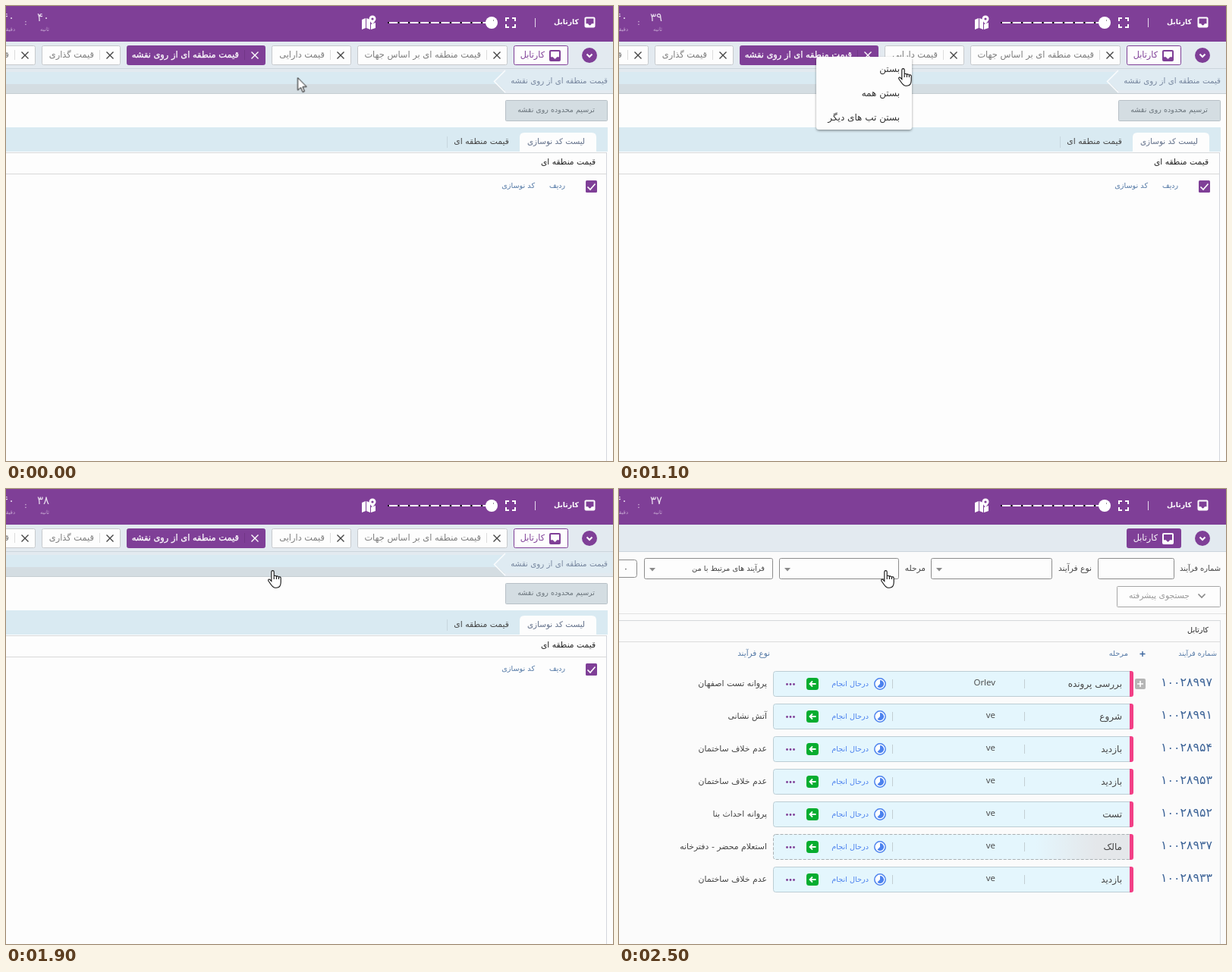
Animation, 800 px wide and 600 px high, one loop 2.7 s. Source, as an HTML page:

```html
<!DOCTYPE html>
<html lang="fa">
<head>
<meta charset="utf-8">
<title>کارتابل</title>
<style>
html, body { margin: 0; width: 100%; height: 100%; overflow: hidden; background: #fdfdfd; }
svg { display: block; width: 800px; height: 600px; }
text { font-family: "DejaVu Sans", sans-serif; direction: rtl; }
.latin { font-family: "Open Sans", sans-serif; direction: ltr; text-anchor: end; }
.mid { text-anchor: middle; }
.crisp { shape-rendering: crispEdges; }

.anim { animation: 2.7s step-end -30ms infinite; }
#old { animation-name: old; }
#inbox { animation-name: inbox; }
#list { animation-name: list; }
#hover { animation-name: hover; }
#menu { animation-name: menu; transform-origin: 323px 115px; }
#arrow { animation-name: arrow; }
#hand { animation-name: hand; }
#s40 { animation-name: s40; }
#s39 { animation-name: s39; }
#s38 { animation-name: s38; }
#s37 { animation-name: s37; }

@keyframes old { 0% { visibility: visible } 77.77%, 100% { visibility: hidden } }
@keyframes inbox { 0% { visibility: hidden } 77.77%, 100% { visibility: visible } }
@keyframes list { 0% { visibility: hidden } 81.48%, 100% { visibility: visible } }
@keyframes hover { 0% { opacity: 0 } 29.62% { opacity: .5 } 33.33% { opacity: 1 } 37.03%, 100% { opacity: 0 } }
@keyframes menu {
  0% { opacity: 0; transform: scale(.5) }
  33.33% { opacity: .6; transform: scale(.715) }
  37.03% { opacity: .95; transform: scale(.95) }
  40.74% { opacity: 1; transform: none }
  62.96% { opacity: .7; transform: none }
  66.66% { opacity: .25; transform: none }
  70.37%, 100% { opacity: 0; transform: none }
}
@keyframes arrow {
  0% { transform: translate(384.5px, 94.5px); visibility: visible }
  14.81% { transform: translate(384.5px, 88.5px) }
  18.51% { transform: translate(384.5px, 77.5px) }
  22.22% { transform: translate(384.5px, 70.5px) }
  25.92% { transform: translate(385.5px, 68.5px) }
  29.62% { transform: translate(385.5px, 66.5px) }
  37.03% { transform: translate(385.5px, 69.5px); visibility: visible }
  40.74%, 100% { transform: translate(385.5px, 69.5px); visibility: hidden }
}
@keyframes hand {
  0% { transform: translate(368px, 82px); visibility: hidden }
  40.74% { transform: translate(368px, 82px); visibility: visible }
  44.44% { transform: translate(355px, 97px); visibility: visible }
  48.14% { transform: translate(347px, 105px); visibility: visible }
  51.85%, 100% { transform: translate(345px, 107px); visibility: visible }
}
@keyframes s40 { 0% { visibility: visible } 18.51%, 100% { visibility: hidden } }
@keyframes s39 { 0% { visibility: hidden } 18.51% { visibility: visible } 59.25%, 100% { visibility: hidden } }
@keyframes s38 { 0% { visibility: hidden } 59.25% { visibility: visible } 92.59%, 100% { visibility: hidden } }
@keyframes s37 { 0% { visibility: hidden } 92.59%, 100% { visibility: visible } }
</style>
</head>
<body>
<svg id="stage" viewBox="0 0 800 600"></svg>
<script>
const PURPLE = '#7f3f97', PAGE = '#fdfdfd', CYAN = '#e4f6fd';

const rect = (x, y, w, h, fill, more = '') =>
  `<rect x="${x}" y="${y}" width="${w}" height="${h}" fill="${fill}" ${more}/>`;
const box = (x, y, w, h, fill, edge, r = 2, more = '') =>
  rect(x + .5, y + .5, w - 1, h - 1, fill, `rx="${r}" stroke="${edge}" ${more}`);
const line = (d, color, width = 1, more = '') =>
  `<path d="${d}" fill="none" stroke="${color}" stroke-width="${width}" ${more}/>`;
const fill = (d, color) => `<path d="${d}" fill="${color}"/>`;
const text = (x, y, size, color, str, more = '') =>
  `<text x="${x}" y="${y}" font-size="${size}" fill="${color}" ${more}>${str}</text>`;
const group = (id, body) => `<g id="${id}" class="anim">${body}</g>`;
const at = (x, y, body) => `<g transform="translate(${x} ${y})">${body}</g>`;

const tray = (x, y, s, color) => at(x, y,
  `<rect x="1" y="1" width="${s - 2}" height="${s - 2}" rx="1" fill="none" stroke="${color}" stroke-width="2"/>` +
  fill(`M1 ${s * .62}H${s * .33}Q${s * .5} ${s * .95} ${s * .67} ${s * .62}H${s - 1}V${s - 1}H1z`, color));

function header() {
  const corners = 'M659 20V16H663M667 16H671V20M671 24V28H667M663 28H659V24';
  const second = n => group('s' + n,
    text(49, 20, 15, '#e8dcee', String(n).replace(/\d/g, d => '۰۱۲۳۴۵۶۷۸۹'[d]), 'class="mid"'));
  return rect(0, 0, 800, 47, PURPLE) +
    tray(762.5, 14.5, 14, '#fff') +
    text(755, 24, 9.3, '#fff', 'کارتابل', 'font-weight="bold"') +
    rect(697, 16, 1, 12, '#e6d8ec') +
    line(corners, '#fff', 2) +
    line('M503 22H633', '#160a1c', 2) +
    line('M505 22H633', '#fff', 2, 'stroke-dasharray="11.2 2.5"') +
    '<circle cx="640" cy="22" r="8" fill="#fff"/>' + rect(642, 18, 1, 2, '#999') +
    fill('M469 18L474 16V29L469 31zM475 16L480 18V31L475 29zM481 24L487 22V29L481 31z', '#fff') +
    fill('M483 24Q478.500 19 478.500 17A4.500 4.500 0 0 1 487.500 17Q487.500 19 483 24z', '#fff') +
    `<circle cx="483" cy="17" r="1.600" fill="${PURPLE}"/>` +
    [40, 39, 38, 37].map(second).join('') +
    text(57, 33, 7, '#c5a6d1', 'ثانیه') +
    text(26, 25, 10, '#e8dcee', ':', 'class="mid"') +
    text(11, 20, 15, '#e8dcee', '۴۰') +
    text(12, 33, 7, '#c5a6d1', 'دقیقه');
}

function tab(x, right, label, active) {
  const ink = active ? '#fff' : '#7d7d7d', cross = active ? '#fff' : '#444';
  return box(x, 52, right - x, 26, active ? PURPLE : PAGE, active ? PURPLE : '#c6c9cc') +
    (label === 'قیمت دارایی' ? group('hover', rect(x + 1, 53, 76, 24, '#e6e6e6')) : '') +
    text(right - 35, 68, 11.4, ink, label, active ? 'stroke="#fff" stroke-width=".25"' : '') +
    rect(right - 28, 58, 1, 13, active ? '#713587' : '#dcdcdc') +
    line(`M${right - 18.5} 60.500l9 9m0 -9l-9 9`, cross, 1.4);
}

const inboxTab = (bg, ink) => box(669, 52, 72, 26, bg, PURPLE) +
  tray(716, 58, 15, ink) + text(710, 68, 11.2, ink, 'کارتابل');

function tabBar() {
  return rect(0, 47, 800, 35, '#e3eaf0') + rect(0, 82, 800, 1, '#cbd5dc') +
    `<circle cx="769" cy="65" r="10" fill="${PURPLE}"/>` +
    line('M765.500 63.500l3.500 3.500l3.500 -3.500', '#fff', 2);
}

function oldView() {
  const area = 'قیمت منطقه ای', page = area + ' از روی نقشه';
  return inboxTab(PAGE, PURPLE) +
    tab(463, 661, area + ' بر اساس جهات') +
    tab(350, 455, 'قیمت دارایی') +
    tab(159, 342, page, true) +
    tab(47, 151, 'قیمت گذاری') +
    tab(-70, 39, 'قیمت') +
    rect(0, 83, 800, 33, '#e3eaf0') +
    rect(0, 87, 657, 16, '#d9eaf2') + rect(0, 103, 657, 12, '#d4dde2') +
    fill('M800 84H658L644 99L657 111H800z', '#dfebf2') +
    rect(0, 115, 800, 1, '#c6ced3') +
    line('M658 85L643.500 99.500L658 114', '#fafcfd', 1.5) +
    text(793, 102, 10.3, '#7888a0', page) +
    box(658, 124, 135, 28, '#d4dde2', '#b7c0c6', 1) +
    text(776, 140, 9.5, '#6b757c', 'ترسیم محدوده روی نقشه') +
    rect(0, 160, 793, 32, '#d9eaf2') +
    fill('M677 192V173Q677 167 683 167H772Q778 167 778 173V192z', PAGE) +
    text(763, 182, 10.4, '#62708a', 'لیست کد نوسازی') +
    text(663, 182, 10.8, '#444', area) +
    rect(581, 172, 1, 15, '#c7d6de') +
    rect(0, 193, 792, 1, '#d6d9db') + rect(0, 221, 792, 1, '#d9d9d9') +
    rect(791, 193, 1, 407, '#d3d6dc') +
    text(777, 209, 10.7, '#222', area) +
    rect(764, 230, 15, 16, PURPLE, 'rx="1.5"') +
    line('M766.500 238.500l3.500 3.500l6.500 -7.500', '#fff', 1.6) +
    text(737, 240, 9.4, '#5479a6', 'ردیف') +
    text(697, 240, 9.7, '#5479a6', 'کد نوسازی');
}

const select = (x, right) => box(x, 91, right - x, 28, PAGE, '#8c8c8c') +
  fill(`M${x + 7} 104h8l-4 4.500z`, '#8a8a8a');

function row([number, stage, user, kind], i) {
  const dashed = i === 5;
  const body = box(203, 0, 474, 34, dashed ? 'url(#fade)' : CYAN, dashed ? '#a9b0b3' : '#bccdd4', 3,
    dashed ? 'stroke-dasharray="4 2"' : '');
  const status = at(344, 17, '<circle r="7.200" fill="#fff" stroke="#4c82ee" stroke-width="1.500"/>' +
    fill('M0 -5A5 5 0 1 1 -3.500 3.500L0 0z', '#4c82ee'));
  const go = rect(247, 9, 16, 16, '#06ad2f', 'rx="3.5"') + line('M259.500 17H251.500M255 13.500L251.500 17L255 20.500', '#fff', 1.8);
  const dots = [221.5, 226, 230.5].map(x => `<circle cx="${x}" cy="17.500" r="1.400" fill="${PURPLE}"/>`).join('');
  const more = i ? '' : rect(680, 10, 14, 14, '#b5b5b5', 'rx="2"') + line('M683 17H691M687 13V21', '#fff', 1.6);
  return at(0, 240 + 43 * i,
    text(782, 20, 15.8, '#3d6498', number) + body +
    fill('M673 0H675Q678 0 678 3V31Q678 34 675 34H673z', '#f23f86') +
    text(663, 21, 12, '#444', stage) + rect(534, 11, 1, 12, '#c3ced3') +
    text(496, 19, 11.5, '#444', user, 'class="latin"') + rect(360, 11, 1, 12, '#c3ced3') +
    status + text(329, 20, 9.7, '#4c82ee', 'درحال انجام') + go + dots + more +
    text(195, 20, 10.9, '#444', kind));
}

function listView() {
  const unsafe = 'عدم خلاف ساختمان';
  const rows = [
    ['۱۰۰۲۸۹۹۷', 'بررسی پرونده', 'Orlev', 'پروانه تست اصفهان'],
    ['۱۰۰۲۸۹۹۱', 'شروع', 've', 'آتش نشانی'],
    ['۱۰۰۲۸۹۵۴', 'بازدید', 've', unsafe],
    ['۱۰۰۲۸۹۵۳', 'بازدید', 've', unsafe],
    ['۱۰۰۲۸۹۵۲', 'تست', 've', 'پروانه احداث بنا'],
    ['۱۰۰۲۸۹۳۷', 'مالک', 've', 'استعلام محضر - دفترخانه'],
    ['۱۰۰۲۸۹۳۳', 'بازدید', 've', unsafe]
  ];
  return rect(0, 83, 800, 517, '#fbfbfb') +
    text(793, 108, 9.9, '#444', 'شماره فرآیند') +
    box(631, 91, 101, 28, PAGE, '#8c8c8c') +
    text(623, 108, 10.7, '#444', 'نوع فرآیند') + select(411, 571) +
    text(404, 108, 10.6, '#444', 'مرحله') + select(211, 369) +
    select(33, 203) + text(192, 108, 9.8, '#444', 'فرآیند های مرتبط با من') +
    box(-8, 93, 32, 24, PAGE, '#8c8c8c', 3) + text(12, 109, 11, '#333', '۰') +
    box(656, 128, 137, 28, PAGE, '#a6a6a6', 1) +
    text(752, 144, 10.8, '#999', 'جستجوی پیشرفته') +
    line('M763.500 138.500l4.500 4.500l4.500 -4.500', '#888', 1.6) +
    rect(0, 164, 800, 1, '#e2e2e2') +
    rect(0, 173, 793, 1, '#d6d9db') + rect(0, 201, 793, 1, '#dcdcdc') + rect(792, 173, 1, 427, '#d6d9dd') +
    text(777, 189, 9.7, '#222', 'کارتابل') +
    text(788, 220, 9.3, '#5479a6', 'شماره فرآیند') +
    line('M686.500 217.500H693.500M690 214V221', '#3e68a0', 1.4) +
    text(671, 220, 9.8, '#5479a6', 'مرحله') +
    text(199, 220, 10.4, '#5479a6', 'نوع فرآیند') +
    rows.map(row).join('');
}

function menu() {
  const items = ['بستن', 'بستن همه', 'بستن تب های دیگر'];
  return rect(260, 67, 126, 96, PAGE, 'rx="4" filter="url(#shadow)"') +
    items.map((s, i) => text(370, 87 + 32 * i, 12, '#333', s)).join('');
}

const arrow = '<path d="M0 0V16.500L4 13L6.600 19L9 18L6.500 12H11.700z" fill="#fff" stroke="#111"/>';
const hand = '<path d="M4.800 14.500V2.300a1.700 1.700 0 0 1 3.400 0V8.500c.4-1.800 3-1.600 3.200.4c.4-1.500 2.800-1.300 3 .7' +
  'c.5-1.300 2.800-1 2.800 1V16c0 4-2 7.300-6 7.300H10C6.500 23.300 5 20 2.500 16.500L.9 14.200C0 12.600 1.800 11.300 3 12.600z" ' +
  'fill="#fff" stroke="#111" stroke-width="1.100"/>' + line('M8.200 8.500V12M11.400 9V12M14.400 9.600V12', '#111', 1.1);

const defs = `<defs>
  <linearGradient id="fade"><stop offset=".73" stop-color="${CYAN}"/><stop offset=".9" stop-color="#e4e7ea"/></linearGradient>
  <filter id="shadow" x="-10%" y="-10%" width="120%" height="125%">
    <feDropShadow dx="0" dy="1.500" stdDeviation="1.500" flood-opacity=".4"/></filter></defs>`;

document.getElementById('stage').innerHTML = defs + rect(0, 0, 800, 600, PAGE) + header() + tabBar() +
  group('old', oldView()) + group('inbox', inboxTab(PURPLE, '#fff')) + group('list', listView()) +
  group('menu', menu()) + group('arrow', arrow) + group('hand', hand);
</script>
</body>
</html>
```
